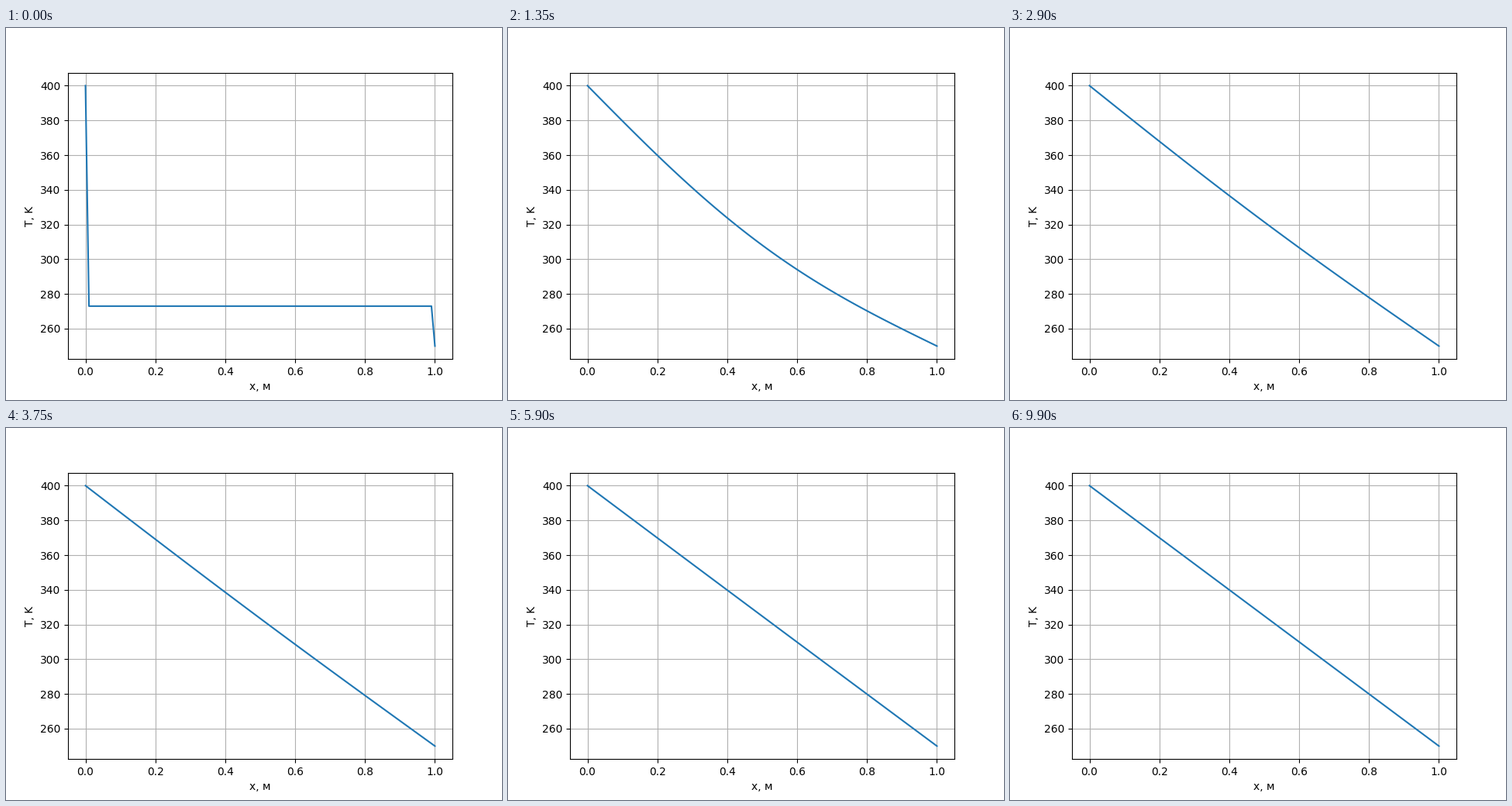
Recreate the animation shown at these times as a matplotlib script. Size 640 by 480 pixels, loop 10000 ms.

```python
import numpy as np
import matplotlib.pyplot as plt
from matplotlib.animation import FuncAnimation

FRAMES = 200
INTERVAL = 50
T_LEFT, T_RIGHT, T_START = 400.0, 250.0, 273.0

# Steel rod, 1 m long, 400 s of heating per frame
DIFFUSIVITY = 46.0 / (7800.0 * 460.0)
STEP = 400.0

x = np.linspace(0, 1, 101)
steady = T_LEFT + (T_RIGHT - T_LEFT) * x

# Sine series of the initial deviation from the steady profile
n = np.arange(1, 61)
sign = (-1.0) ** n
coef = 2 / (n * np.pi) * ((T_START - T_LEFT) - sign * (T_START - T_RIGHT))
modes = np.sin(np.pi * np.outer(x, n))
rate = DIFFUSIVITY * (n * np.pi) ** 2


def temperature(frame):
    if frame == 0:
        temp = np.full_like(x, T_START)
    else:
        temp = steady + modes @ (coef * np.exp(-rate * STEP * frame))
    temp[0], temp[-1] = T_LEFT, T_RIGHT
    return temp


fig, ax = plt.subplots(figsize=(6.4, 4.8), dpi=100)
line, = ax.plot(x, temperature(0))
ax.set_xlim(-0.05, 1.05)
ax.set_ylim(242.5, 407.5)
ax.set_xlabel("x, м")
ax.set_ylabel("T, K")
ax.grid(True)


def update(frame):
    line.set_ydata(temperature(frame))
    return line,


anim = FuncAnimation(fig, update, frames=FRAMES, interval=INTERVAL,
                     repeat=True, repeat_delay=0)
plt.show()
```
